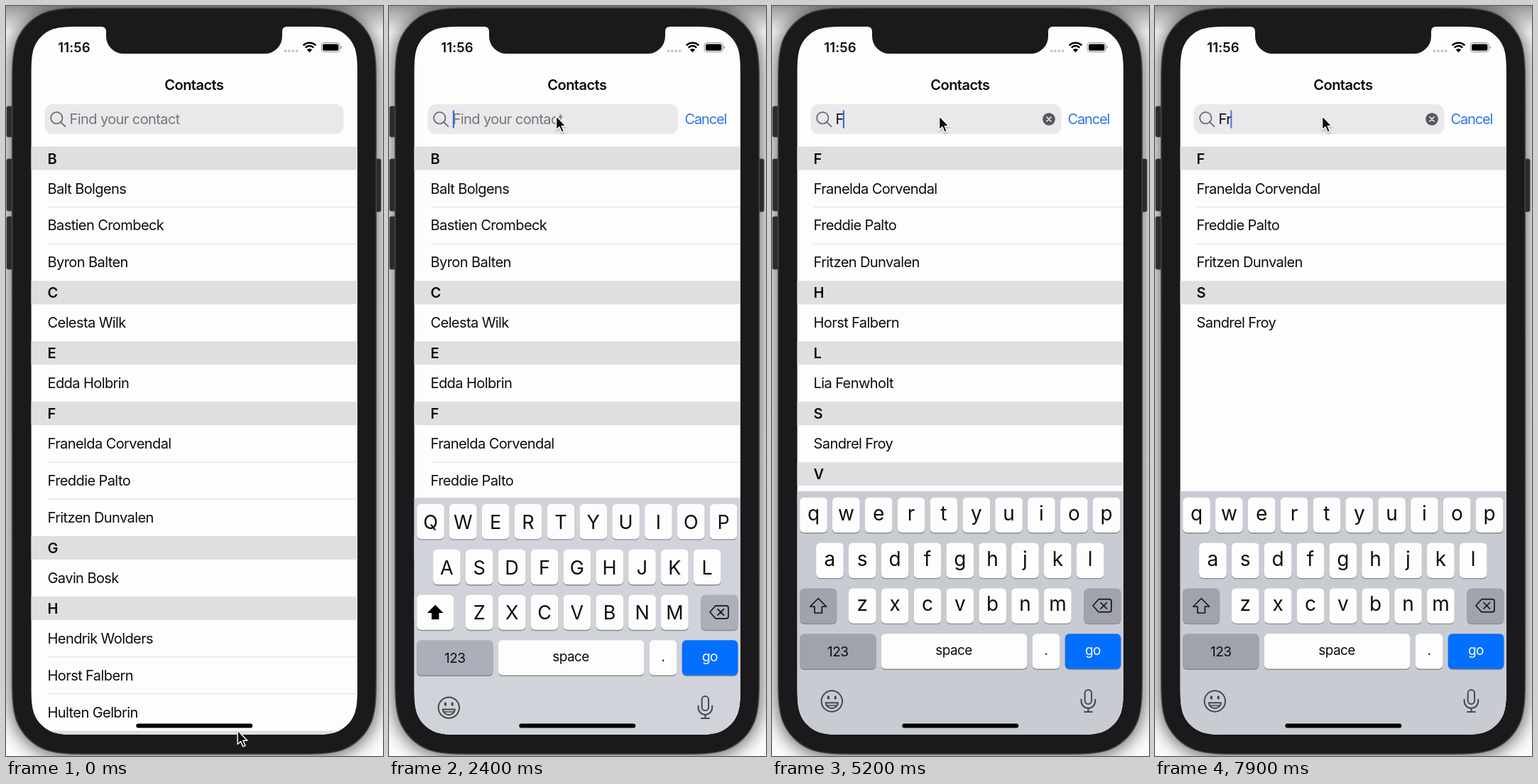
An HTML page that plays this animation: 531x1054 px, repeating every 8000 ms.

```html
<!DOCTYPE html>
<html lang="en">
<head>
<meta charset="utf-8">
<title>Contact search</title>
<style>
  html, body { margin: 0; width: 100%; height: 100%; overflow: hidden; background: #b4b4b5; }
  svg { display: block; width: 100vw; height: 100vh; }
  text { font-family: Inter, Roboto, "Liberation Sans", sans-serif; font-size: 20.1px; letter-spacing: -.63px; fill: #0d0c0f; white-space: pre; }
  .bold { font-weight: 600; }
  .mid { text-anchor: middle; }
  .big { font-size: 27px; letter-spacing: 0; }
  .low { font-size: 28px; letter-spacing: 0; }
  .label { font-size: 19px; }
  .line { fill: none; stroke: #47484c; stroke-width: 2; stroke-linecap: round; stroke-linejoin: round; }
  .board { fill: #c8cbd2; }
  .gray { fill: #9fa4ac; }
  .rising .board { fill: #d0d3d9; }
  .rising .gray { fill: #abafb9; }
</style>
</head>
<body>
<svg id="stage" viewBox="0 0 531 1054" preserveAspectRatio="none">
  <defs>
    <linearGradient id="wall" x1="0" y1="0" x2="0" y2="1">
      <stop offset="0" stop-color="#9b9b9c"/>
      <stop offset=".035" stop-color="#f6f6f6"/>
      <stop offset="1" stop-color="#fdfdfd"/>
    </linearGradient>
    <filter id="soft" x="-20%" y="-20%" width="140%" height="140%"><feGaussianBlur stdDeviation="14"/></filter>
    <filter id="drop" x="-50%" y="-50%" width="200%" height="200%"><feDropShadow dx="0" dy="1.5" stdDeviation="1.2" flood-opacity=".35"/></filter>
    <clipPath id="glass"><path id="screen"/></clipPath>
  </defs>
  <rect width="531" height="1054" fill="url(#wall)"/>
  <path id="shadow" opacity=".7" filter="url(#soft)"/>
  <g id="buttons"></g>
  <path id="body" fill="#1a191c" stroke="#47474a" stroke-width="1.5"/>

  <g clip-path="url(#glass)">
    <rect x="35" y="29" width="461" height="995" fill="#fefdfe"/>
    <g id="lists"></g>

    <text class="bold mid" x="264.8" y="117.5" style="letter-spacing:-.58px">Contacts</text>
    <rect id="field" x="54.5" y="138" width="421" height="42" rx="11.5" fill="#e9e8ea"/>
    <g class="line" style="stroke:#67666b;stroke-width:1.7">
      <circle cx="71.3" cy="157.3" r="8.2"/>
      <path d="M77.3 163.3L83.5 169.3"/>
    </g>
    <text id="hint" x="89.5" y="166" style="fill:#77767b">Find your contact</text>
    <text id="typed" x="89.5" y="166"></text>
    <rect id="caret" y="146.5" width="2.2" height="25.5" rx="1" fill="#3b6ae0"/>
    <g id="clear">
      <circle cx="390" cy="159" r="8.8" fill="#58575b"/>
      <path d="M387 156l6 6M393 156l-6 6" stroke="#f2f1f3" stroke-width="1.7" stroke-linecap="round"/>
    </g>
    <text id="cancel" y="166" style="fill:#2f78e6;letter-spacing:-1.2px">Cancel</text>

    <g id="keyboard">
      <rect class="board" x="35" y="682" width="461" height="345"/>
      <g id="fixed"></g>
      <g id="upper"></g>
      <g id="lower"></g>
      <g class="line">
        <circle cx="84.3" cy="977" r="14.7"/>
        <path d="M75.7 979.3H93A8.7 8.7 0 0 1 75.7 979.3Z"/>
        <path d="M77.5 983H91" stroke-width="1.5"/>
        <path d="M79.4 970.8v2.2M89.2 970.8v2.2" stroke-width="3.2"/>
      </g>
      <g class="line">
        <rect x="440.7" y="961" width="9.4" height="20" rx="4.7"/>
        <path d="M435.6 974.5V977a9.8 9.8 0 0 0 19.6 0V974.5M445.4 987V992M440 992H450.8"/>
      </g>
    </g>
    <rect x="183.3" y="1008.5" width="164" height="6.1" rx="3" fill="#000"/>
  </g>

  <path d="M131 28H399.5V29H396Q389 29 389 36V42.5A24.5 24.5 0 0 1 364.5 67H165.5A24.5 24.5 0 0 1 141 42.5V36Q141 29 134 29H131Z" fill="#1a191c"/>
  <text class="bold" x="73.3" y="65.3" style="font-size:18.6px;letter-spacing:.1px">11:56</text>
  <g id="status">
    <rect x="444.2" y="51.6" width="26" height="13" rx="3.6" fill="none" stroke="#8d8c90"/>
    <rect x="446" y="53.4" width="22.4" height="9.4" rx="2.2"/>
    <path d="M471.4 56v4.2q1.7-.6 1.7-2.1t-1.7-2.1" fill="#9d9ca0"/>
  </g>
  <path id="pointer" d="M0 0V19.4L4.4 15.4 7.6 22.8 10.9 21.4 7.8 14.2H13.7Z" fill="#0b0b0c" stroke="#fff" stroke-width="1.4" stroke-linejoin="round" filter="url(#drop)"/>
</svg>
<script>
const LOOP = 8000, STEP = 100;
const FOCUS = 2100, TYPE_F = 4900, TYPE_R = 6500;
const PEOPLE = [
  "Balt Bolgens", "Bastien Crombeck", "Byron Balten", "Celesta Wilk", "Edda Holbrin",
  "Franelda Corvendal", "Freddie Palto", "Fritzen Dunvalen", "Gavin Bosk",
  "Hendrik Wolders", "Horst Falbern", "Hulten Gelbrin", "Lia Fenwholt",
  "Sandrel Froy", "Vesna Folden"
];

const $ = id => document.getElementById(id);
const clamp = v => Math.max(0, Math.min(1, v));
const smooth = v => (1 - Math.cos(Math.PI * clamp(v))) / 2;

function add(parent, tag, attrs, label) {
  const el = document.createElementNS("http://www.w3.org/2000/svg", tag);
  for (const k in attrs) el.setAttribute(k, attrs[k]);
  if (label) el.textContent = label;
  parent.appendChild(el);
  return el;
}
const rect = (parent, x, y, width, height, more) => add(parent, "rect", { x, y, width, height, ...more });
const write = (parent, x, y, label, cls = "") => add(parent, "text", { x, y, class: cls }, label);
const show = (el, on) => el.setAttribute("visibility", on ? "visible" : "hidden");

// Rounded box whose corners ease gradually into the straight sides
function squircle(left, top, right, bottom, r) {
  const corner = (x, y, ux, uy) => {
    const vx = uy, vy = -ux;
    const p = (a, b) => `${x + r * (a * ux + b * vx)} ${y + r * (a * uy + b * vy)} `;
    return p(1.53, 0) + "C" + p(1.09, 0) + p(.87, 0) + p(.631, .075) +
      p(.373, .169) + p(.169, .373) + p(.075, .631) + p(0, .87) + p(0, 1.09) + p(0, 1.53);
  };
  return "M" + [corner(left, top, 0, 1), corner(right, top, -1, 0),
    corner(right, bottom, 0, -1), corner(left, bottom, 1, 0)].join("L") + "Z";
}
$("screen").setAttribute("d", squircle(35.6, 29, 494.9, 1024, 48));
$("body").setAttribute("d", squircle(8.7, 2.7, 521.3, 1051.3, 76));
$("shadow").setAttribute("d", squircle(8, 4, 522, 1054, 76));

// Side buttons
for (const [x, y, h] of [[1, 141, 43], [1, 215, 73], [1, 296, 74], [519.5, 215, 74]])
  rect($("buttons"), x, y, 8.5, h, { rx: 2, fill: "#2b2b2d", stroke: "#444447" });

// Signal dots and wireless arcs
for (let i = 0; i < 4; i++)
  add($("status"), "circle", { cx: 393.6 + i * 5.3, cy: 63.2, r: 1.9, fill: "#c6c5c9" });
for (const r of [12.2, 7.9]) {
  const d = r * .72;
  add($("status"), "path", {
    d: `M${427.5 - d} ${64.2 - d}A${r} ${r} 0 0 1 ${427.5 + d} ${64.2 - d}`,
    fill: "none", stroke: "#000", "stroke-width": 2.5
  });
}
add($("status"), "path", { d: "M427.5 65.3L423.9 61.5Q427.5 58.6 431.1 61.5Z" });

// Contact list for one query
function buildList(query) {
  const g = add($("lists"), "g", {});
  let y = 197.5, initial = "";
  for (const name of PEOPLE.filter(n => n.toLowerCase().includes(query))) {
    if (name[0] !== initial) {
      initial = name[0];
      rect(g, 35, y, 461, 33, { fill: "#e0dee1" });
      write(g, 58.5, y + 24, initial, "bold");
      y += 33;
    } else {
      rect(g, 59, y - .5, 437, 1, { fill: "#dddce0" });
    }
    write(g, 58.5, y + 33, name);
    y += 51.92;
  }
  return g;
}
const lists = ["", "f", "fr"].map(buildList);

// Keyboard
function key(parent, x, y, w, style = { fill: "#fefdfe" }) {
  rect(parent, x, y + 1.4, w, 49.3, { rx: 6, fill: "#888a8e" });
  rect(parent, x, y, w, 49.3, { rx: 6, ...style });
}
const GRAY = { class: "gray" };
const ROWS = [["QWERTYUIOP", 39.2], ["ASDFGHJKL", 62.1], ["ZXCVBNM", 108]];
ROWS.forEach(([letters, left], row) => {
  [...letters].forEach((c, i) => {
    const x = left + i * 45.85, y = 690.8 + row * 63.8, mid = x + 19.3;
    key($("fixed"), x, y, 38.6);
    write($("upper"), mid, y + 35, c, "big mid");
    write($("lower"), mid, y + 32, c.toLowerCase(), "low mid");
  });
});
const ARROW = "M65.2 832.5L76.6 844H70.4V853H60V844H53.8Z";
key($("upper"), 39.2, 818.4, 52);
add($("upper"), "path", { d: ARROW, fill: "#000" });
key($("lower"), 39.2, 818.4, 52, GRAY);
add($("lower"), "path", { d: ARROW, class: "line", style: "stroke:#151517;stroke-width:1.7" });

const fixed = $("fixed");
key(fixed, 439.4, 818.4, 52, GRAY);
add(fixed, "path", {
  d: "M460 833.7H475Q478 833.7 478 836.7V848.7Q478 851.7 475 851.7H460L452 842.7ZM463 838.5L471.5 847M471.5 838.5L463 847",
  class: "line", style: "stroke:#151517;stroke-width:1.7"
});
key(fixed, 39.2, 882.2, 107.3, GRAY);
key(fixed, 153.8, 882.2, 205.5);
key(fixed, 366.8, 882.2, 38.6);
key(fixed, 412.8, 882.2, 78.6, { fill: "#026fff" });
write(fixed, 92.7, 914, "123", "label mid");
write(fixed, 256, 912, "space", "label mid");
write(fixed, 386, 912, ".", "label mid");
write(fixed, 452, 912, "go", "label mid").style.fill = "#fff";

function pointerAt(t) {
  if (t >= 1600) return [235.5, 154.5];
  if (t >= 1500) return [236, 155];
  const p = smooth((t - 200) / 800), q = 1 - p;
  const bend = (a, b, c) => q * q * a + 2 * p * q * b + p * p * c;
  return [bend(326.2, -90, 236.5), bend(1018, 560, 156)];
}

// Solid after each input, then a soft pulse
function caretAlpha(t) {
  const from = t >= TYPE_R ? TYPE_R + 500 : t >= TYPE_F ? TYPE_F + 500 : 3200;
  return t < from ? 1 : (1 + Math.cos((t - from) / 800 * 2 * Math.PI)) / 2;
}

function draw(t) {
  const count = t >= TYPE_R ? 2 : t >= TYPE_F ? 1 : 0;
  const focused = t > FOCUS;

  const [px, py] = pointerAt(t);
  $("pointer").setAttribute("transform", `translate(${px} ${py})`);

  const open = focused ? smooth((t - 2070) / 220) : 0;
  const right = 475.5 - 68 * open;
  $("field").setAttribute("width", right - 54.5);
  $("cancel").setAttribute("x", right + 9);
  $("cancel").setAttribute("opacity", open < 1 ? open * .75 : 1);

  // Critically damped rise
  const s = focused ? (t - FOCUS + 3) * .01815 : 0;
  $("keyboard").setAttribute("transform", `translate(0 ${342 * (1 + s) * Math.exp(-s)})`);
  $("keyboard").setAttribute("class", t < 2700 ? "rising" : "");

  show($("upper"), count === 0);
  show($("lower"), count > 0);
  show($("hint"), count === 0);
  show($("clear"), count > 0);
  lists.forEach((g, i) => show(g, i === count));
  $("typed").textContent = "Fr".slice(0, count);
  $("caret").setAttribute("x", [89.8, 99.8, 106.2][count]);
  $("caret").setAttribute("opacity", focused ? caretAlpha(t) : 0);
}

const start = performance.now();
function tick() {
  const t = (performance.now() - start) % LOOP;
  draw(Math.floor(t / STEP) * STEP);
  requestAnimationFrame(tick);
}
draw(0);
requestAnimationFrame(tick);
</script>
</body>
</html>
```
